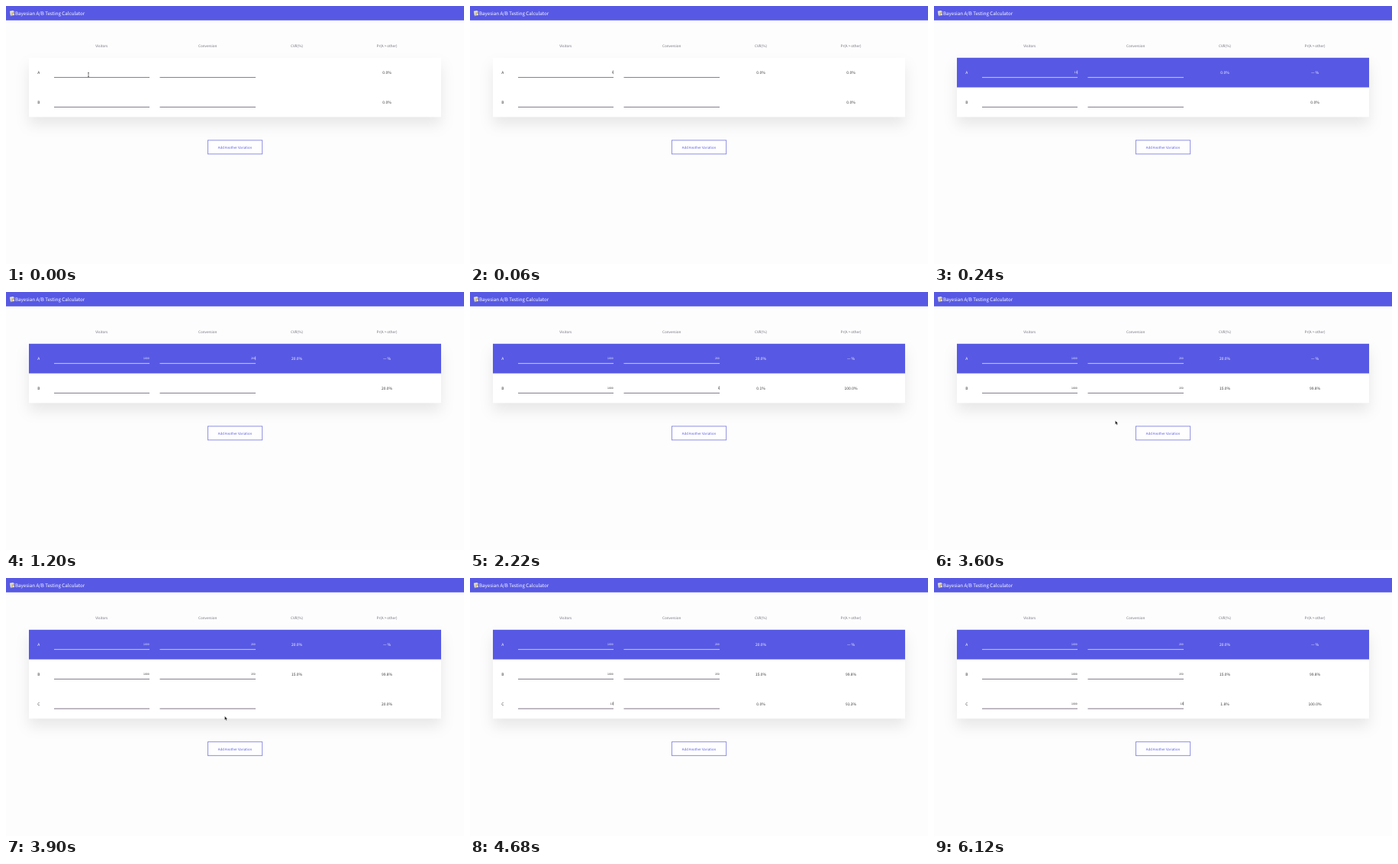
An HTML page for the animation above (6300 ms loop, 600 by 338 pixels).

```html
<!DOCTYPE html>
<html lang="en">
<head>
<meta charset="utf-8">
<style>
  html, body { margin: 0; width: 100%; height: 100%; overflow: hidden; background: #fdfdfe; }
  svg { display: block; width: 100%; height: 100%; }
  text { font: 4.97px "Noto Sans CJK JP", "Noto Sans CJK SC", "Noto Sans CJK", "Noto Sans", sans-serif;
         text-rendering: geometricPrecision; text-anchor: middle; fill: #333338; }
  #title { font-size: 6.21px; text-anchor: start; fill: #fff; }
  .head { font-size: 4.66px; fill: #73737d; }
  .field { font-size: 3.42px; text-anchor: end; fill: #222; }
  .row line { stroke: #81778a; stroke-width: 1; }
  .row .caret { stroke: #333; stroke-width: .5; }
  .band { fill: none; }
  .lit .band { fill: #5759e4; }
  .lit text { fill: #fff; }
  .lit line { stroke: #c6c6f4; }
  .lit .caret { stroke: #fff; }
  #card { fill: #fff; filter: drop-shadow(0 10px 9px rgba(0, 0, 0, .085)); }
  #button rect { fill: #fefeff; stroke: #8183dd; stroke-width: .9; }
  #button text { font-size: 4.35px; fill: #5759e4; }
  #button.hover rect { fill: #5759e4; }
  #button.hover text { fill: #fff; }
</style>
</head>
<body>
<svg id="stage" viewBox="0 0 600 338" preserveAspectRatio="none">
  <rect width="600" height="18.8" fill="#5759e4"/>
  <g id="icon">
    <path d="M5 6.8 9.6 6 11 12 6 13.2Z" fill="#eeeedd"/>
    <path d="M6.2 8.6 9 8M6.5 10 8.5 9.6M6.8 11.4 9.6 10.8" stroke="#8d9a8c" stroke-width=".5"/>
    <path d="M7.3 11.2 11 7" stroke="#d9ad43" stroke-width="1.3"/>
    <path d="M5 12.8 10.6 12.6" stroke="#5f8062" stroke-width=".7"/>
  </g>
  <text id="title" x="12" y="12">Bayesian A/B Testing Calculator</text>
  <rect id="card" x="30" y="67.8" width="540"/>
  <g id="rows"></g>
  <g id="button">
    <rect x="264.4" y="175.9" width="71.3" height="18"/>
    <text x="300" y="186.8">Add Another Variation</text>
  </g>
  <path id="arrow" d="M0 0V5L1.2 4 2 5.8 2.9 5.4 2.1 3.7H3.6Z" fill="#111" stroke="#fff" stroke-width=".3"/>
  <path id="beam" d="M-1-2.7Q0-2.7 0-2Q0-2.7 1-2.7M0-2V2M-1 2.7Q0 2.7 0 2Q0 2.7 1 2.7" fill="none" stroke="#222" stroke-width=".6"/>
</svg>
<script>
const LOOP = 6300, ROW_HEIGHT = 38.8, ROW_ADDED = 3900, LEAD_SHOWN = 240;
const VISITORS = 0, CONVERSION = 1;
const FIELD_START = [63, 201.5], FIELD_END = [188, 327];
const $ = id => document.getElementById(id);

// time, row, field, typed value, resulting probability
const edits = [
  [60, 0, VISITORS, '1', '0.0%'], [240, 0, VISITORS, '10', '— %'],
  [420, 0, VISITORS, '100', '— %'], [600, 0, VISITORS, '1000', '— %'],
  [960, 0, CONVERSION, '2', '— %'], [1080, 0, CONVERSION, '20', '— %'], [1200, 0, CONVERSION, '200', '— %'],
  [1560, 1, VISITORS, '1', '36.0%'], [1680, 1, VISITORS, '10', '91.3%'],
  [1740, 1, VISITORS, '100', '100.0%'], [1860, 1, VISITORS, '1000', '100.0%'],
  [2040, 1, CONVERSION, '', '100.0%'], [2220, 1, CONVERSION, '1', '100.0%'],
  [2340, 1, CONVERSION, '15', '100.0%'], [2460, 1, CONVERSION, '150', '99.8%'],
  [4500, 2, VISITORS, '1', '36.0%'], [4680, 2, VISITORS, '10', '91.3%'],
  [4800, 2, VISITORS, '100', '100.0%'], [4920, 2, VISITORS, '1000', '100.0%'],
  [5220, 2, CONVERSION, '', '100.0%'], [5580, 2, CONVERSION, '1', '100.0%'], [5940, 2, CONVERSION, '18', '100.0%']
];

// time, x, y of the pointer while it is visible
const pointerPath = [
  [3240, 108, 90], [3420, 165, 135], [3600, 237.5, 168.5], [3780, 286.5, 181],
  [3960, 286.5, 181], [4260, 156, 168]
];

function add(parent, tag, attributes, content = '') {
  const node = document.createElementNS('http://www.w3.org/2000/svg', tag);
  for (const name in attributes) node.setAttribute(name, attributes[name]);
  node.textContent = content;
  return parent.appendChild(node);
}

[['Visitors', 125.3], ['Conversion', 264.2], ['CVR(%)', 381], ['Pr(A > other)', 499]]
  .forEach(([label, x]) => add($('stage'), 'text', { class: 'head', x, y: 54.3 }, label));

const rows = ['A', 'B', 'C'].map((name, i) => {
  const group = add($('rows'), 'g', { class: 'row', transform: `translate(0 ${67.8 + i * ROW_HEIGHT})` });
  add(group, 'rect', { class: 'band', x: 30, width: 540, height: ROW_HEIGHT });
  add(group, 'text', { x: 42.8, y: 21.4 }, name);
  const fields = FIELD_END.map((end, f) => {
    add(group, 'line', { x1: FIELD_START[f], x2: end, y1: 25.8, y2: 25.8 });
    return add(group, 'text', { class: 'field', x: end - .4, y: 20.5 });
  });
  const rate = add(group, 'text', { x: 381, y: 21.4 });
  const chance = add(group, 'text', { x: 499, y: 21.4 });
  const caret = add(group, 'line', { class: 'caret', y1: 16.6, y2: 21.4 });
  return { group, fields, rate, chance, caret };
});

function show(node, visible) {
  node.style.display = visible ? '' : 'none';
}

function pointerAt(t) {
  if (t < 60) return [108, 90];
  if (t < 3240 || t >= 4500) return null;
  const next = pointerPath.findIndex(point => point[0] > t);
  if (next < 0) return pointerPath.at(-1).slice(1);
  const [t0, x0, y0] = pointerPath[next - 1], [t1, x1, y1] = pointerPath[next];
  const k = (t - t0) / (t1 - t0);
  return [x0 + (x1 - x0) * k, y0 + (y1 - y0) * k];
}

function drawRows(t) {
  const done = edits.filter(edit => edit[0] <= t);
  const last = done.at(-1);
  const leadRate = done.findLast(edit => edit[1] === 0 && edit[2] === CONVERSION)?.[3] / 10 || 0;
  rows.forEach((row, i) => {
    const values = ['', ''];
    let chance = (i ? leadRate : 0).toFixed(1) + '%';
    for (const [, index, field, value, result] of done) {
      if (index !== i) continue;
      values[field] = value;
      chance = result;
    }
    row.fields.forEach((node, f) => node.textContent = values[f]);
    row.rate.textContent = values[VISITORS] && (100 * values[CONVERSION] / values[VISITORS]).toFixed(1) + '%';
    row.chance.textContent = chance;

    const focused = last && last[1] === i && !(t >= 3240 && t < 4500);
    show(row.caret, focused && (t - last[0]) % 1000 < 500);
    if (focused) for (const end of ['x1', 'x2']) row.caret.setAttribute(end, FIELD_END[last[2]] - .3);
  });
}

function draw(t) {
  t = Math.floor(t / 60) * 60;
  const added = t >= ROW_ADDED;
  rows[0].group.classList.toggle('lit', t >= LEAD_SHOWN);
  show(rows[2].group, added);
  $('card').setAttribute('height', ROW_HEIGHT * (added ? 3 : 2));
  $('button').setAttribute('transform', `translate(0 ${added ? ROW_HEIGHT : 0})`);
  $('button').classList.toggle('hover', t >= 3720 && !added);
  drawRows(t);

  const pointer = pointerAt(t);
  const overField = pointer && pointer[0] < 188 && (t < 60 || t >= 4140);
  show($('arrow'), pointer && !overField);
  show($('beam'), overField);
  if (pointer) $(overField ? 'beam' : 'arrow').setAttribute('transform', `translate(${pointer})`);
}

const start = performance.now();
function tick() {
  draw((performance.now() - start) % LOOP);
  requestAnimationFrame(tick);
}
tick();
</script>
</body>
</html>
```
